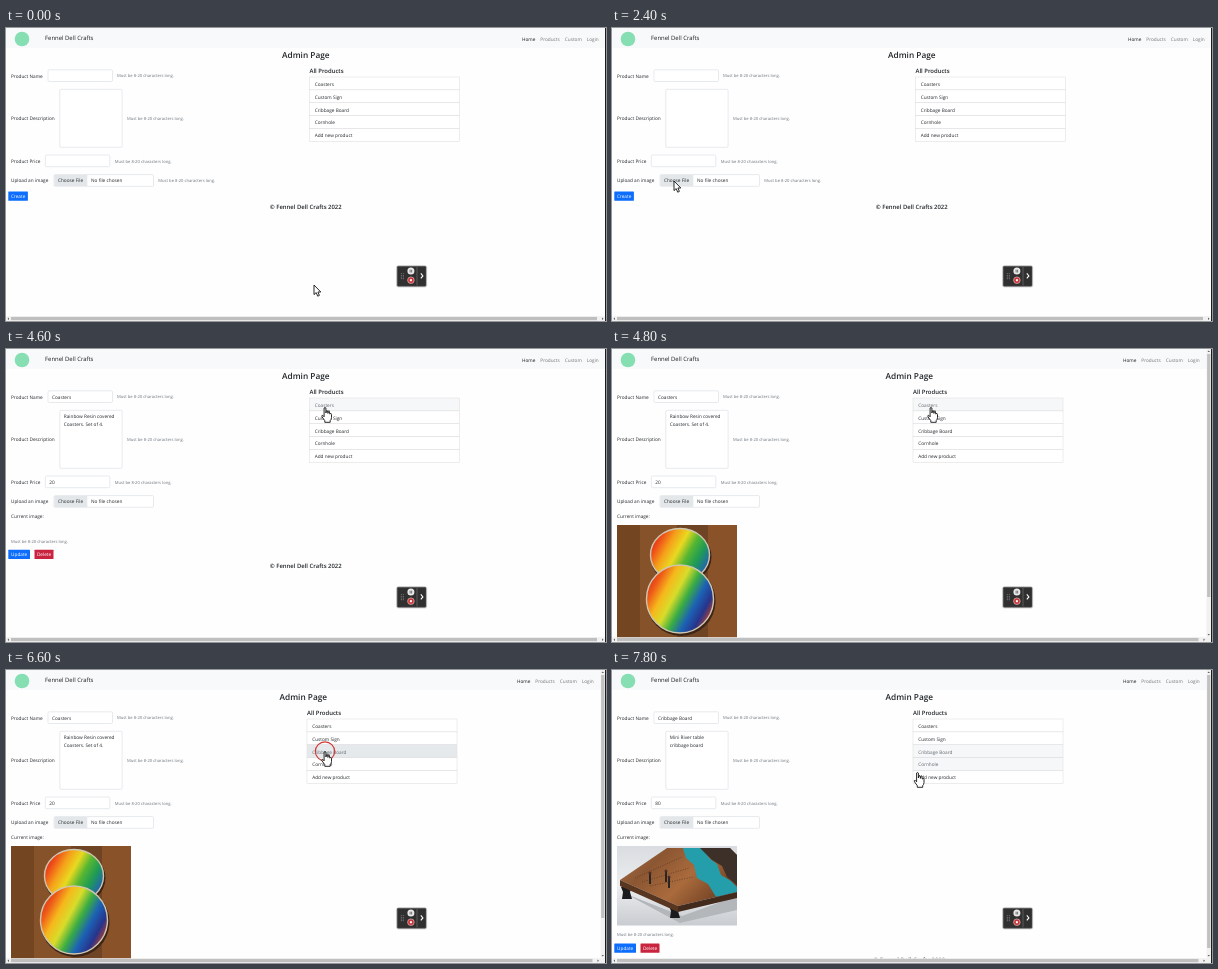
Animation of 600x293 px, one loop 8 s. Source, as an HTML page:

```html
<!DOCTYPE html>
<html lang="en">
<head>
<meta charset="utf-8">
<title>Admin Page</title>
<style>
  html, body { margin: 0; width: 100%; height: 100%; overflow: hidden; background: #fefefe; }
  svg { display: block; width: 100%; height: 100%; }
  text { font-family: "Open Sans", "Noto Sans", sans-serif; text-rendering: geometricPrecision; white-space: pre; }
</style>
</head>
<body>
<svg id="stage" viewBox="0 0 600 293" xmlns="http://www.w3.org/2000/svg"></svg>
<script>
const LOOP = 8000, STEP = 200, REM = 4.74;
const INK = '#212529', MUTED = '#6c757d', LINE = '#ced4da';
const SHOP = 'Fennel Dell Crafts';
const ITEMS = ['Coasters', 'Custom Sign', 'Cribbage Board', 'Cornhole', 'Add new product'];
const ROW_TOP = 49, ROW_H = 12.9;

const EMPTY = { name: '', lines: [], price: '' };
const COASTERS = { name: 'Coasters', lines: ['Rainbow Resin covered', 'Coasters. Set of 4.'], price: '20' };
const BOARD = { name: 'Cribbage Board', lines: ['Mini River table', 'cribbage board'], price: '80' };

// time, x, y of the pointer
const PATH = [
  [0, 308, 257], [300, 300, 248], [1200, 79, 48], [1400, 79, 48], [1800, 82, 88],
  [2100, 72, 132], [2400, 62, 153], [2700, 12, 168], [2900, 14, 167], [3400, 300, 72],
  [3700, 319, 59], [4800, 319, 59], [5300, 319, 67], [5500, 319, 67], [6000, 319, 82],
  [7400, 319, 82], [7600, 315, 83], [7800, 305.5, 103], [8000, 305.5, 103]
];

const rect = (x, y, w, h, fill, extra = '') =>
  `<rect x="${x}" y="${y}" width="${w}" height="${h}" fill="${fill}" ${extra}/>`;
const circle = (x, y, r, fill, extra = '') =>
  `<circle cx="${x}" cy="${y}" r="${r}" fill="${fill}" ${extra}/>`;
const path = (d, fill, extra = '') => `<path d="${d}" fill="${fill}" ${extra}/>`;
const text = (x, y, s, size = 1, fill = INK, extra = '') =>
  `<text x="${x}" y="${y}" font-size="${(size * REM).toFixed(2)}" fill="${fill}" ${extra}>${s}</text>`;
const heading = (x, y, s, size, anchor = 'start') =>
  text(x, y, s, size, INK, `font-weight="600" text-anchor="${anchor}"`);
const hint = (x, y) => text(x, y, 'Must be 8-20 characters long.', 0.875, MUTED);
const box = (x, y, w, h) => rect(x, y, w, h, '#fff', `stroke="${LINE}" stroke-width=".5" rx="1.2"`);

// last value whose start time has passed
const pick = (list, t) => list.reduce((v, [at, val]) => t >= at ? val : v, list[0][1]);

function pointerAt(t) {
  const i = Math.max(1, PATH.findIndex(p => p[0] >= t));
  const [a, b] = [PATH[i - 1], PATH[i]];
  const u = Math.min(1, Math.max(0, (t - a[0]) / (b[0] - a[0])));
  const e = u * u * (3 - 2 * u);
  return [a[1] + (b[1] - a[1]) * e, a[2] + (b[2] - a[2]) * e];
}

const inside = ([x, y], l, t, r, b) => x > l && x < r && y > t && y < b;

function stateAt(t) {
  const pos = pointerAt(t);
  const s = {
    pos,
    hover: pick([[0, -1], [3600, 0], [5200, 1], [5800, 2], [7600, 3]], t),
    focus: pick([[0, -1], [4000, 0], [6600, 2]], t),
    press: t === 4000 || t === 6600 || t === 6800,
    form: pick([[0, EMPTY], [4200, COASTERS], [6800, BOARD]], t),
    photo: pick([[0, ''], [4800, 'discs'], [7000, 'board']], t),
    onButton: t < 3600 && inside(pos, 2, 163, 22, 173)
  };
  const typing = inside(pos, 42, 42, 106, 54) || inside(pos, 54, 61, 116, 119) || inside(pos, 39, 127, 104, 139);
  s.shape = s.hover >= 0 || s.onButton ? 'hand' : typing ? 'beam' : 'arrow';
  return s;
}

function navbar(dx) {
  const links = [[516, 'Home'], [534.3, 'Products'], [558.8, 'Custom'], [580.8, 'Login']];
  return rect(0, 0, 600, 20, '#f8f9fa') +
    circle(16, 11, 7.3, '#86dfb2') +
    text(39, 11.8, SHOP, 1.25, '#1c1d1e') +
    links.map(([x, s], i) => text(x - dx, 12.6, s, 1, i ? '#737475' : '#191919')).join('');
}

function products(s, dx) {
  const x = 303.5 - dx / 2;
  const rows = ITEMS.map((name, i) => {
    const lit = i === s.hover || i === s.focus;
    const fill = s.press && i === s.hover ? '#e6e9ec' : lit ? '#f6f7f9' : '#fff';
    const y = ROW_TOP + i * ROW_H;
    return rect(x, y, 150, ROW_H, fill, 'stroke="#dcdcdd" stroke-width=".5"') +
      text(x + 5.2, y + 8.7, name, 1, lit ? '#62686e' : INK);
  });
  return heading(x, 45.4, 'All Products', 1.25) + rows.join('');
}

function fields(f) {
  return text(5, 49.6, 'Product Name') + box(42, 41.8, 64.5, 11.7) + text(46, 49.6, f.name) + hint(111, 49.4) +
    text(5, 92, 'Product Description') + box(53.8, 61.3, 62.3, 58) +
    f.lines.map((line, i) => text(57.8, 69 + i * 7.5, line)).join('') + hint(121, 91.8) +
    text(5, 134.8, 'Product Price') + box(39.3, 127, 64.5, 11.7) + text(43.3, 134.8, f.price) + hint(108.7, 134.6) +
    text(5, 154.4, 'Upload an image') + box(48, 146.6, 99.5, 11.7) +
    rect(48.3, 146.9, 33, 11.1, '#e4e7ea') + text(52, 154.4, 'Choose File') + text(85, 154.4, 'No file chosen');
}

function button(x, y, w, label, fill) {
  return rect(x, y, w, 9.3, fill, 'rx=".5"') +
    text(x + w / 2, y + 6.5, label, 1, '#fff', 'text-anchor="middle"');
}

function lower(s, dx) {
  const mid = 299.7 - dx / 2;
  const foot = y => heading(mid, y, `© ${SHOP} 2022`, 1.25, 'middle');
  if (s.form === EMPTY) {
    return hint(152.3, 154.2) + button(2.3, 163.4, 19.6, 'Create', s.onButton ? '#0b5ed7' : '#0d6efd') + foot(181.3);
  }
  const drop = { '': 0, discs: 113, board: 72.7 }[s.photo];
  return text(5, 169, 'Current image:') +
    (s.photo === 'discs' ? discs() : s.photo === 'board' ? board() : '') +
    hint(5, 193.6 + drop) +
    button(2.3, 200.8 + drop, 21.7, 'Update', '#0d6efd') +
    button(28.5, 200.8 + drop, 19, 'Delete', '#c9243f') +
    foot(218.8 + drop);
}

function gradient(id, dir, colors) {
  const stops = colors.map((c, i) => `<stop offset="${i / (colors.length - 1)}" stop-color="${c}"/>`);
  return `<linearGradient id="${id}" ${dir}>${stops.join('')}</linearGradient>`;
}

function discs() {
  const planks = [[5, 23, '#744521'], [28, 37, '#85522a'], [65, 31, '#6f4424'], [96, 29, '#895229']];
  const disc = (y, rx, ry, id) =>
    `<ellipse cx="69" cy="${y + 2}" rx="${rx + 1}" ry="${ry + 1}" fill="#3c2417"/>` +
    `<ellipse cx="68" cy="${y}" rx="${rx}" ry="${ry}" fill="url(#${id})" stroke="#cfc6b0" stroke-width="1.4"/>`;
  return gradient('back', 'x1="0" y1=".1" x2="1" y2=".6"',
      ['#c9201c', '#ee4a18', '#f5a01a', '#e9d920', '#55b632', '#1f9b55', '#2266ad']) +
    gradient('front', 'x1="0" y1=".2" x2="1" y2=".75"',
      ['#d7261b', '#ee5a18', '#f6b81c', '#d8dc2a', '#3aad42', '#1c62b5', '#27348b', '#d5431f']) +
    planks.map(([x, w, c]) => rect(x, 176, w, 120, c)).join('') +
    disc(206, 29.5, 26.5, 'back') + disc(250, 33.5, 34, 'front');
}

function board() {
  const foot = (x, y) => path(`M${x} ${y}h11l-2 5 2 7h-10l1-7z`, '#191b1c');
  const peg = (x, y) => rect(x, y, 2, 11, '#2b2524') + circle(x + 1, y, 1.5, '#4a2c22');
  return gradient('wall', 'x1="0" y1="0" x2="0" y2="1"', ['#d9dce0', '#eceef0', '#c9ccd0']) +
    gradient('wood', 'x1="0" y1="0" x2="1" y2=".5"', ['#a8744a', '#8b5632', '#aa6b3c', '#754426']) +
    rect(5, 176, 120, 79.5, 'url(#wall)') +
    path('M14 224L70 246 125 226V240L68 253z', '#b4b7ba') +
    foot(9, 217) + foot(57, 236) +
    path('M8 210L55 178H118L125 185V222L66 236z', 'url(#wood)') +
    path('M71 178H91L97 188 105 194 109 205 119 211 125 217V222L104 227 96 214 85 208 82 195 74 188z', '#259eab') +
    path('M88 178H118L125 185V215L115 207 110 196 100 190z', '#3d3029') +
    path('M8 210L66 236V242L8 216z', '#593620') +
    path('M66 236L125 222V228L66 242z', '#422a1d') +
    path('M23 208L70 187M30 212L77 198M38 216L81 207', 'none', 'stroke="#5e3a24" stroke-width=".8" stroke-dasharray="1 1.5"') +
    peg(37, 203) + peg(53, 201) + peg(56, 207);
}

function scrollbars(s) {
  const tall = s.photo !== '';
  const w = tall ? 594.5 : 599;
  let out = rect(0, 288.2, 599, 4.8, '#f1f1f1') +
    rect(5, 288.9, w - 13, 3.3, '#bfbfbf') +
    path(`M3 289.4V292L1.5 290.7zM${w - 3} 289.4V292L${w - 1.5} 290.7z`, '#606060');
  if (tall) {
    out += rect(594.5, 0, 4.5, 288.2, '#f1f1f1') +
      rect(595.1, 5, 3.3, s.photo === 'discs' ? 243 : 273, '#c1c1c1') +
      path('M595.5 3H598L596.8 1.5zM595.5 285H598L596.8 286.5z', '#606060');
  }
  return out + rect(599, 0, 1, 293, '#1c1c1c');
}

function recorder() {
  let dots = '';
  for (let i = 0; i < 8; i++) dots += circle(395.2 + (i % 2) * 2, 245.6 + (i >> 1) * 1.7, 0.45, '#c8c8c8');
  return rect(390.2, 237.4, 31, 22.2, '#000', 'opacity=".14" rx="2"') +
    rect(391.2, 238.2, 28.8, 20, '#303030', 'stroke="#555" stroke-width=".6" rx="1"') +
    dots +
    circle(404.9, 243.1, 3.5, '#e8e8e8') +
    rect(403.7, 241.7, 0.8, 2.8, '#555') + rect(405.3, 241.7, 0.8, 2.8, '#555') +
    circle(404.9, 252.2, 3.3, '#c93438', 'stroke="#e6d2d2" stroke-width=".6"') +
    rect(403.9, 251.2, 2, 2, '#fff') +
    rect(410.7, 239, 0.6, 18.4, '#777') +
    path('M414.8 245.4l2.1 2.5-2.1 2.5', 'none', 'stroke="#fff" stroke-width="1.1"');
}

function pointer(s) {
  const [x, y] = s.pos;
  const edge = 'stroke="#111" stroke-width=".9" stroke-linejoin="round"';
  const shapes = {
    arrow: path('M0 0V9.6L2.2 7.6 3.7 11.2 5.4 10.4 3.9 7H6.8z', '#fff', edge),
    beam: path('M-2.6-5.2H-.6L0-4.6.6-5.2H2.6M0-4.6V4.6M-2.6 5.2H-.6L0 4.6.6 5.2H2.6', 'none', 'stroke="#111" stroke-width="1.4"'),
    hand: path('M-.9 0Q0-1.1 .9 0V5Q2-.0 2.9 4.6V5.4Q4-.0 4.7 5.2V6Q6.3 4.6 6.5 6.4V9.6Q6.3 11.6 5.2 12.6V14.3H-.2V12.7L-3 8.8Q-3.6 7.2-2.3 7.3L-.9 8.8z', '#fff', edge)
  };
  const ring = s.press ? circle(x, y - 0.6, 9.6, 'none', 'stroke="#cf3a36" stroke-width="1.2"') : '';
  return ring + `<g transform="translate(${x.toFixed(2)} ${y.toFixed(2)})">${shapes[s.shape]}</g>`;
}

function scene(t) {
  const s = stateAt(t);
  const dx = s.photo ? 5 : 0;
  return rect(0, 0, 600, 293, '#fefefe') + navbar(dx) +
    heading(299.8 - dx / 2, 29.8, 'Admin Page', 1.75, 'middle') +
    products(s, dx) + fields(s.form) + lower(s, dx) +
    scrollbars(s) + recorder() + pointer(s);
}

const stage = document.getElementById('stage');
const start = performance.now();
let shown = -1;

function tick() {
  const t = Math.floor(((performance.now() - start) % LOOP) / STEP) * STEP;
  if (t !== shown) stage.innerHTML = scene(shown = t);
  requestAnimationFrame(tick);
}
tick();
</script>
</body>
</html>
```
